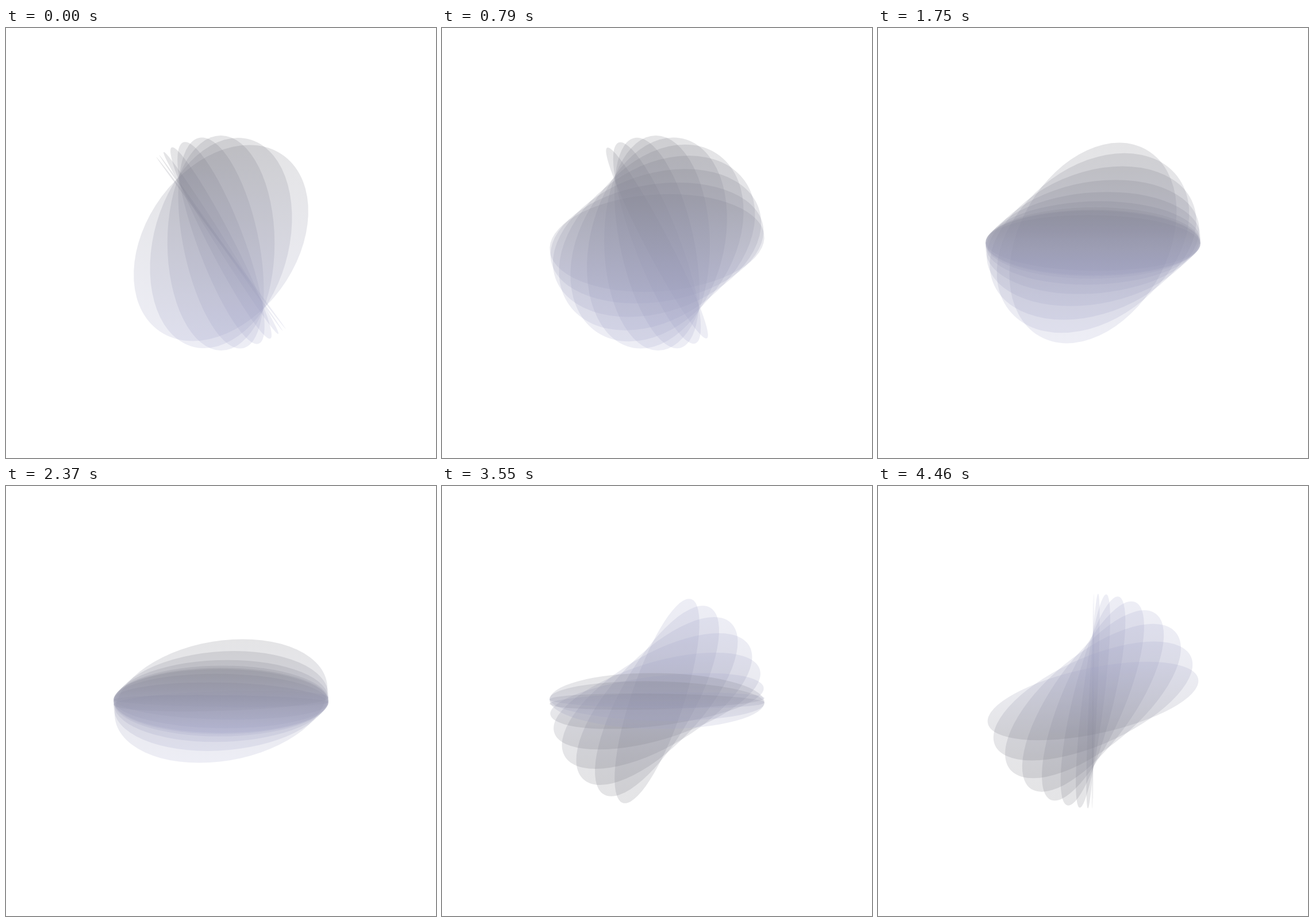
An HTML page with a canvas that plays this animation: 748x748 px, repeating every 4510 ms.

```html
<!DOCTYPE html>
<html lang="en">
<head>
<meta charset="utf-8">
<title>Turning discs</title>
<style>
  html, body { margin: 0; width: 100%; height: 100%; overflow: hidden; background: #fff; }
  canvas { display: block; width: 748px; height: 748px; }
</style>
</head>
<body>
<canvas id="stage" width="748" height="748"></canvas>
<script>
const LOOP = 4510, TURN = 3000, LAG = 200, LEAD = 1600, DISCS = 10;
const SIZE = 748, RADIUS = SIZE / 4;
const ctx = document.getElementById('stage').getContext('2d');

const shade = ctx.createLinearGradient(0, -RADIUS, 0, RADIUS);
shade.addColorStop(0, 'rgba(120, 120, 129, 0.2)');
shade.addColorStop(1, 'rgba(165, 167, 206, 0.2)');

// cubic-bezier(.42, 0, .58, 1)
function easeInOut(x) {
  let lo = 0, hi = 1;
  for (let i = 0; i < 24; i++) {
    const s = (lo + hi) / 2;
    if (s * (1.26 + s * (0.52 * s - 0.78)) < x) lo = s; else hi = s;
  }
  return lo * lo * (3 - 2 * lo);
}

// Flat projection of rotateY(b) rotateX(a)
function drawDisc(a, b) {
  ctx.setTransform(Math.cos(b), 0, Math.sin(a) * Math.sin(b), Math.cos(a), SIZE / 2, SIZE / 2);
  ctx.beginPath();
  ctx.arc(0, 0, RADIUS, 0, 2 * Math.PI);
  ctx.fill();
}

function draw(time) {
  ctx.setTransform(1, 0, 0, 1, 0, 0);
  ctx.clearRect(0, 0, SIZE, SIZE);
  ctx.fillStyle = shade;
  const rad = Math.PI / 180;
  for (let k = 0; k < DISCS; k++) {
    const turns = (time + LEAD - k * LAG) / TURN;
    const whole = Math.floor(turns);
    const q = whole + easeInOut(turns - whole);
    drawDisc((36 - 108 * q) * rad, (90 - 90 * q) * rad);
  }
}

function tick() {
  draw(performance.now() % LOOP);
  requestAnimationFrame(tick);
}
tick();
</script>
</body>
</html>
```
